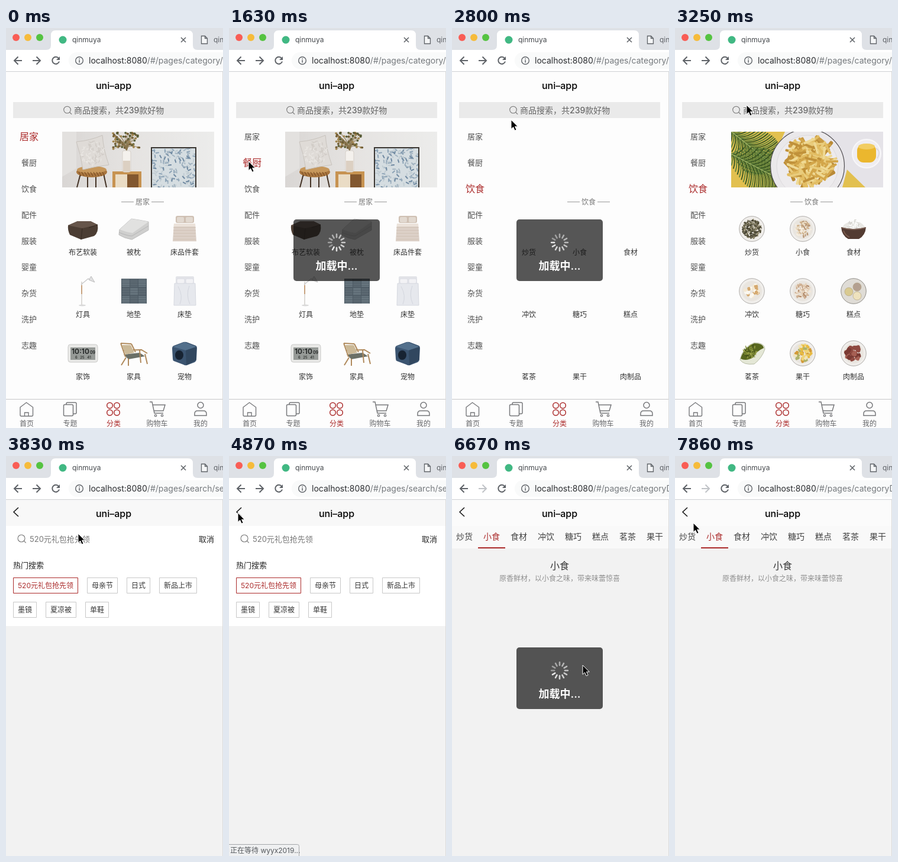
These frames come from a looping animation (367x675 px, 8 s). An HTML page with a canvas:

```html
<!DOCTYPE html>
<html lang="zh-CN">
<head>
<meta charset="utf-8">
<title>uni-app</title>
<style>
html, body { margin: 0; width: 100%; height: 100%; overflow: hidden; background: #fff; }
canvas { display: block; width: 367px; height: 675px; }
</style>
</head>
<body>
<canvas id="stage"></canvas>
<script>
const W = 367, H = 675, LOOP = 8000, TICK = 147.5;
const RED = '#ab2b2b', GREY = '#5f6368', PAGE = '#fdfdfd';
const FONT = 'Inter, "Noto Sans CJK SC", "Noto Sans CJK", sans-serif';
const cv = document.getElementById('stage');
const ratio = window.devicePixelRatio || 1;
cv.width = W * ratio;
cv.height = H * ratio;
const c = cv.getContext('2d');

const SIDE = ['居家', '餐厨', '饮食', '配件', '服装', '婴童', '杂货', '洗护', '志趣'];
const ITEMS = [
  ['布艺软装', '被枕', '床品件套', '灯具', '地垫', '床垫', '家饰', '家具', '宠物'],
  ['锅具', '餐具', '茶具', '刀具', '杯壶', '厨具', '酒具', '清洁', '收纳'],
  ['炒货', '小食', '食材', '冲饮', '糖巧', '糕点', '茗茶', '果干', '肉制品']
];

// --- helpers ---
function text(s, x, y, size, color, align = 'left', weight = 400) {
  c.font = `${weight} ${size}px ${FONT}`;
  c.textAlign = align;
  c.fillStyle = color;
  c.fillText(s, x, y + size * 0.37);
}
function rect(x, y, w, h, fill) {
  c.fillStyle = fill;
  c.fillRect(x, y, w, h);
}
function paint(fill, stroke, lw = 1) {
  if (fill) { c.fillStyle = fill; c.fill(); }
  if (stroke) { c.strokeStyle = stroke; c.lineWidth = lw; c.stroke(); }
}
function round(x, y, w, h, r, fill, stroke, lw) {
  c.beginPath();
  c.roundRect(x, y, w, h, r);
  paint(fill, stroke, lw);
}
function oval(x, y, rx, ry, fill, stroke, lw) {
  c.beginPath();
  c.ellipse(x, y, rx, ry, 0, 0, 7);
  paint(fill, stroke, lw);
}
const disc = (x, y, r, fill, stroke, lw) => oval(x, y, r, r, fill, stroke, lw);
function shape(d, fill, stroke, lw = 1, x = 0, y = 0) {
  const p = new Path2D(d);
  c.save();
  c.translate(x, y);
  if (fill) { c.fillStyle = fill; c.fill(p); }
  if (stroke) { c.strokeStyle = stroke; c.lineWidth = lw; c.stroke(p); }
  c.restore();
}
function random(seed) {
  return () => (seed = (seed * 16807) % 2147483647) / 2147483647;
}
// pieces scattered over a disc
function scatter(x, y, spread, n, colors, w, h, seed) {
  const rnd = random(seed * 7919 + 13);
  rnd();
  for (let i = 0; i < n; i++) {
    const a = rnd() * 6.283, r = Math.sqrt(rnd()) * spread;
    c.save();
    c.translate(x + Math.cos(a) * r, y + Math.sin(a) * r);
    c.rotate(rnd() * 3.14);
    round(-w / 2, -h / 2, w, h, Math.min(w, h) / 3, colors[i % colors.length]);
    c.restore();
  }
}

// --- browser frame ---
function chrome(path, canForward) {
  rect(0, 0, W, 37, '#dee1e6');
  ['#f95d55', '#f6bb3a', '#55c341'].forEach((col, i) => disc(17 + i * 20, 16, 6, col));
  shape('M68 37Q76 37 76 29V12Q76 4 84 4H308Q316 4 316 12V29Q316 37 324 37Z', '#fff');
  disc(96, 20, 6.5, '#41b883');
  text('qinmuya', 112, 20, 12, '#45494d');
  shape('M296 16l8 8m0-8l-8 8', null, GREY, 1.6);
  shape('M330.5 13.5h6l4 4v9h-10zM336.5 13.5v4h4', '#f5f6f7', GREY, 1.3);
  text('qinmuya', 351, 20, 12, GREY);
  rect(0, 37, W, 36, '#fff');
  shape('M27 55H14m6.5-6.5L14 55l6.5 6.5', null, GREY, 2);
  shape('M45 55H58m-6.5-6.5L58 55l-6.5 6.5', null, canForward ? GREY : '#c0c3c7', 2);
  shape('M89 51A6 6 0 1 0 90 56.5', null, GREY, 2);
  shape('M91 48v6h-6z', GREY);
  round(106, 41, 290, 28, 14, '#f9fafa');
  disc(124, 55, 6.3, null, GREY, 1.4);
  rect(123.3, 54, 1.5, 4.5, GREY);
  rect(123.3, 51.3, 1.5, 1.6, GREY);
  text('localhost:8080', 140, 55, 14, '#2b2d30');
  const w = c.measureText('localhost:8080').width;
  text('/#/pages/' + path, 140 + w, 55, 14, '#75797d');
  rect(0, 73, W, 1, '#cfd1d4');
  rect(366, 74, 1, 601, '#dcdcdc');
}
function navBar(bg, back) {
  rect(0, 74, W, 44, bg);
  text('uni–app', 182, 97, 16, '#000', 'center', 500);
  if (back) shape('M21 87L13 94.5L21 102', null, '#111', 1.5);
}
function lens(x, y, r) {
  disc(x, y, r, null, '#777', 1.1);
  shape(`M${x + r * .7} ${y + r * .7}l3.5 3.5`, null, '#777', 1.2);
}

// --- banners ---
function homeBanner() {
  const wall = c.createLinearGradient(95, 0, 352, 0);
  wall.addColorStop(0, '#d9d6d4');
  wall.addColorStop(.45, '#e5e3e1');
  wall.addColorStop(1, '#ececeb');
  rect(95, 175, 257, 94, wall);
  shape('M95 175h24v62l-24 14z', '#e3e1df');
  shape('M126 246L120 269M165 246L170 269M138 248v21M152 248v21', null, '#433225', 2);
  oval(145, 243, 26, 9, '#a9763f');
  oval(145, 239, 25, 6, '#c6975b');
  for (let x = 123; x < 168; x += 5) shape(`M${x} 243l4 7`, null, '#70451f', 1);
  shape('M119 192Q142 190 163 181Q165 207 174 231Q154 233 130 239Q127 215 119 192Z', '#dfdbd7', '#c8c3bd');
  scatter(146, 211, 20, 70, ['#e9e6e2', '#d1ccc7'], 1.5, 5, 6);
  rect(180, 242, 49, 27, '#c79351');
  rect(185, 247, 39, 22, '#82572f');
  rect(185, 247, 20, 22, '#eadcc5');
  const rnd = random(4211);
  for (let i = 0; i < 70; i++) {
    const x = 180 + rnd() * 46, y = 176 + rnd() * 28;
    shape(`M204 209Q204 194 ${x} ${y}`, null, '#88754d', .5);
    oval(x, y, 2, 1.8, ['#6f5b34', '#a18650', '#565b35'][i % 3]);
  }
  round(197, 207, 14, 36, 3, '#f4f1ed', '#d6d0c9');
  rect(198, 224, 12, 18, '#dcd0c2');
  rect(245, 201, 77, 68, '#3a3632');
  rect(247, 203, 73, 66, '#d5dde1');
  c.save();
  c.beginPath();
  c.rect(247, 203, 73, 66);
  c.clip();
  scatter(284, 237, 48, 230, ['#8ea4b7', '#a3b4c1', '#6f89a1', '#c2cdd3'], 2, 6, 9);
  c.restore();
}
function foodBanner() {
  rect(95, 175, 257, 94, '#e5e3e8');
  shape('M95 175H186L168 215L180 269H95ZM283 269L291 239L322 269Z', '#e2c04f');
  for (let k = 0; k < 2; k++) {
    c.save();
    c.translate(92 + k * 2, 172 + k * 40);
    c.rotate(.68 - k * .2);
    for (let i = 0; i < 26; i++) {
      const x = i * 3.6, len = 34 * Math.sin((i + 4) / 31 * 3.14) + 4;
      shape(`M${x} 0q${len * .5} ${-len * .3} ${len * .6} ${-len}M${x} 0q${len * .5} ${len * .3} ${len * .6} ${len}`,
        null, i % 2 ? '#3c5b26' : '#67853d', 2);
    }
    shape('M0 0H92', null, '#9db267', 1.3);
    c.restore();
  }
  disc(224, 233, 62.5, '#eae8ea', '#4f4c4f', 1.2);
  disc(224, 233, 52, '#edebed', '#dddadd');
  scatter(228, 225, 41, 40, ['#b98a37', '#c99b44'], 6, 20, 4);
  scatter(228, 225, 38, 190, ['#d3a64a', '#e9cc7c', '#efd994', '#c0913a', '#e2bd63'], 4, 21, 21);
  disc(324, 212, 24, '#efedf1', '#f8f7f9', 2);
  round(308, 196, 32, 31, 11, '#ebb72e');
  oval(324, 200, 14, 5, '#f2cd62');
  shape('M340 203q9 5 2 17', null, '#d9d6dc', 1.5);
}

// --- product pictures, drawn around 0,0 ---
const homeArt = [
  () => {
    shape('M-25-6L-9-13H13L25-7Q27 6 19 12L-3 18L-22 10Q-26 2-25-6Z', '#4b3d33');
    shape('M-25-6L-9-13H13L25-7L-1-1Z', '#66554a');
    shape('M-1-1L-3 18M25-7L10-2', null, '#362a22');
  },
  () => {
    shape('M-24 1L-4-17Q10-15 25-12V2L-3 18Q-16 16-25 10Z', '#cfcfce', '#bdbdbd');
    shape('M-24 1L-4-17Q10-15 25-12L-2 7Q-14 5-24 1Z', '#e1e1e0');
    shape('M-25 6Q-10 12-3 12L25-5', null, '#b5b5b6');
  },
  () => {
    round(-15, -22, 31, 12, 3, '#cfc0b3');
    round(-13, -20, 12, 9, 2, '#e2d9d0');
    round(2, -20, 12, 9, 2, '#e2d9d0');
    shape('M-18-9H18L20 21H-20Z', '#dcd0c7');
    for (let y = -3; y < 20; y += 5) rect(-19, y, 38, .7, '#cdbdb1');
    rect(-18, -9, 36, 5, '#ebe2da');
  },
  () => {
    shape('M-2-16V23', null, '#cfcac6', 1.4);
    shape('M-2-10V5', null, '#c9a37f', 2);
    shape('M-3-11L9-21L17-17', null, '#c5c5c6', 1.1);
    shape('M10-19L14-25L20-15Z', '#e0e0e1', '#bebebe');
    oval(-1, 24, 6, 1.5, '#d9d9d9');
  },
  () => {
    rect(-21, -21, 43, 42, '#4c5963');
    for (let i = 0; i < 9; i++) rect(-20 + i % 3 * 14, -20 + Math.floor(i / 3) * 14, 13, 13, i % 2 ? '#5b6871' : '#66747d');
    for (let y = -18; y < 21; y += 4) rect(-21, y, 43, .6, '#4e5b65');
  },
  () => {
    round(-15, -25, 31, 14, 2, '#e2e3e8');
    shape('M-17-13H18L19 24H-18Z', '#e6e8ed', '#d6d9e0');
    round(-13, -21, 13, 8, 2, '#f2f2f5', '#dadce3');
    round(2, -21, 13, 8, 2, '#f2f2f5', '#dadce3');
    shape('M-11-8Q-2 8-8 22M8-9Q2 7 9 22', null, '#d3d6de');
  },
  () => {
    round(-25, -15, 50, 30, 4, '#e9e9e7', '#cbcbca');
    rect(-21, -10, 42, 21, '#969a97');
    text('10:10', -19, -3, 12, '#1c1f1f', 'left', 600);
    text('09', 12, -2, 7, '#1c1f1f', 'left', 600);
    text('6   25   41', -13, 7, 6, '#303431', 'left', 600);
  },
  () => {
    shape('M-17 2L10-1L19 5L-9 10Z', '#6b7067');
    shape('M-22-17L-14 6M-22-17L-4-16M-4-16L3-2M-17-5L13-6L23 0M-13 7L-21 20M-9 9V21M19 1L23 18M10-5L12 16', null, '#b08a5c', 2);
    shape('M-20-14L-5-14L1-1L-14 2Z', '#cbb997');
  },
  () => {
    shape('M-18-13L-2-19Q2-20 6-18L19-13Q21-12 21-9L20 10Q20 13 17 15L4 20Q1 21-2 19L-18 13Q-20 12-20 9L-21-8Q-21-12-18-13Z', '#3b5470');
    shape('M-20-11L0-19L20-11L2-5Z', '#53708c');
    shape('M2-5L20-11V11L3 20Z', '#31475f');
    oval(-9, 3, 7, 8, '#172332');
  }
];
function plate(colors, n, spread, w, h, seed) {
  disc(0, 0, 21.3, '#f0eeeb', '#a7a4a1', .9);
  disc(0, 0, 17, '#e9e5df');
  scatter(0, 0, spread, n, colors, w, h, seed);
}
const foodArt = [
  () => plate(['#3f3d2c', '#6e6a50', '#514c38', '#948c70'], 210, 15.5, 1.7, 4, 3),
  () => plate(['#cfb18b', '#eadbc3', '#f5ede0', '#b99877'], 70, 13, 2.5, 5, 5),
  () => {
    shape('M-19-1Q-17-9-9-11Q0-17 8-12Q17-9 20-1Z', '#e9e8e4');
    scatter(0, -6, 10, 50, ['#fff', '#d6d5d0'], 1.6, 3.5, 8);
    shape('M-21-3Q0 3 21-3Q20 11 9 17H-9Q-20 11-21-3Z', '#533b32');
    shape('M-17 3Q-14 11-7 14', null, '#79594b', 2);
    shape('M-20-2Q0 4 20-2', null, '#82665a', 1.5);
  },
  () => plate(['#fbf8f0', '#f4e8d2', '#d5a96f'], 24, 13, 5, 6, 11),
  () => plate(['#cfb092', '#f3e8d9', '#e5d1b9', '#b58f70'], 75, 13, 2.5, 5, 17),
  () => {
    disc(0, 0, 21.3, '#dfdcd6', '#918e89');
    [[-8, 1, '#d9ca91'], [6, -7, '#b4a090'], [6, 8, '#eee2bd']].forEach(([x, y, col]) => disc(x, y, 7, col, '#ad9c79', .6));
  },
  () => {
    shape('M-20 11Q-16-10 4-18Q22-18 22-7Q17 8 4 18Q-14 20-20 11Z', '#e4e7d6', '#b9bea7');
    shape('M-19 9Q-14-9 4-17Q19-17 20-9Q8-4 2 7Q-10 14-19 9Z', '#58671f');
    scatter(-3, -3, 11, 90, ['#7e8b35', '#46531b', '#9aa24a'], 1.3, 5, 23);
  },
  () => plate(['#e7bb42', '#d39a38', '#f0d479', '#aeb26a', '#efe3bc'], 46, 14, 4.5, 7, 29),
  () => plate(['#8f4a41', '#a65f53', '#7a3a33'], 24, 12, 7.5, 8, 31)
];

// --- pages ---
function tabBar() {
  rect(0, 626, W, 49, PAGE);
  rect(0, 626, W, 1, '#c6c6c8');
  const g = '#77787b';
  shape('M24 640L34.5 632L45.5 640V653Q45.5 655 43.5 655H26Q24 655 24 653ZM31.5 655V649H38V655', null, g, 1.4);
  round(97.5, 635.5, 16, 19, 2, null, g, 1.5);
  shape('M102 635V634Q102 632 104 632H117Q119 632 119 634V649Q119 651 117 651H114', null, g, 1.5);
  for (let i = 0; i < 4; i++) disc(175.5 + i % 2 * 12, 637 + (i >> 1) * 12, 4.8, null, RED, 1.5);
  shape('M243 631H247L251 650H266M248 636H269L266 646H250', null, g, 1.5);
  disc(253, 654, 1.7, null, g, 1.3);
  disc(264, 654, 1.7, null, g, 1.3);
  disc(329, 636.5, 5, null, g, 1.5);
  shape('M319 654V651Q319 646 324 646H334Q339 646 339 651V654Z', null, g, 1.5);
  ['首页', '专题', '分类', '购物车', '我的'].forEach((s, i) =>
    text(s, 35 + i * 73.5, 668, 12, i === 2 ? RED : '#66676a', 'center', 500));
}
function categoryPage(active, shown, loaded) {
  rect(0, 74, W, 601, PAGE);
  navBar(PAGE);
  rect(12, 125, 340, 27, '#eaeaea');
  lens(103.5, 138, 5.8);
  text('商品搜索，共239款好物', 115, 138.5, 14, '#666', 'left', 500);
  SIDE.forEach((s, i) => {
    const on = i === active;
    text(s, 39, 183 + i * 44, on ? 16 : 13, on ? RED : '#505050', 'center');
  });
  if (loaded) {
    c.save();
    c.beginPath();
    c.rect(95, 175, 257, 94);
    c.clip();
    shown ? foodBanner() : homeBanner();
    c.restore();
  }
  rect(195, 293, 21, 1, '#999');
  rect(246, 293, 21, 1, '#999');
  text(SIDE[shown], 231, 293.5, 12, '#777', 'center');
  const art = shown ? foodArt : homeArt;
  ITEMS[shown].forEach((s, i) => {
    const x = 130 + i % 3 * 86, y = 339 + Math.floor(i / 3) * 105;
    if (loaded) {
      c.save();
      c.translate(x, y);
      art[i]();
      c.restore();
    }
    text(s, x, y + 40, 12, '#333', 'center');
  });
  tabBar();
}
function chips(list, y, firstRed) {
  let x = 12;
  list.forEach((s, i) => {
    const red = firstRed && i === 0;
    c.font = `400 12px ${FONT}`;
    const w = Math.round(c.measureText(s).width) + 16;
    round(x + .5, y + .5, w - 1, 26, 0, null, red ? RED : '#c8c8c8', 1);
    text(s, x + 8, y + 13.5, 12, red ? RED : '#333');
    x += w + 15;
  });
}
function searchPage(waiting) {
  rect(0, 74, W, 601, '#f2f2f2');
  rect(0, 118, W, 169, '#fff');
  navBar('#f8f8f8', true);
  lens(26, 139, 6);
  text('520元礼包抢先领', 40, 140.5, 13, '#777');
  text('取消', 326, 140.5, 13, '#222');
  text('热门搜索', 12, 184.5, 13, '#222');
  chips(['520元礼包抢先领', '母亲节', '日式', '新品上市'], 205, true);
  chips(['墨镜', '夏凉被', '单鞋'], 246);
  if (waiting) {
    round(-4, 655.5, 122.5, 24, 3, '#eff0f1', '#a4a6a9');
    text('正在等待 wyyx2019...', 2, 666, 12, '#55595d');
  }
}
function detailPage(ready) {
  rect(0, 74, W, 601, '#f2f2f2');
  navBar('#fbfbfb', true);
  if (!ready) return;
  rect(0, 118, W, 38, '#f9f9f9');
  ITEMS[2].forEach((s, i) => text(s, 7 + i * 46, 135.5, 14, i === 1 ? RED : '#444'));
  rect(44, 154, 46, 2, RED);
  text('小食', 182, 185.5, 16, '#333', 'center');
  text('原香鲜材，以小食之味，带来味蕾惊喜', 182, 207, 12, '#8f8f8f', 'center', 500);
}
function toast(t) {
  round(109, 323, 146, 104, 5, 'rgba(17,17,17,.7)');
  const turn = Math.floor(t / 1000 * 12);
  for (let i = 0; i < 12; i++) {
    const v = i ? 145 + i * 7 : 233;
    c.save();
    c.translate(182, 362);
    c.rotate((i + turn) * Math.PI / 6);
    round(-1.3, -15.2, 2.6, 7.6, 1.3, `rgb(${v},${v},${v})`);
    c.restore();
  }
  text('加载中...', 182, 401, 18, '#fff', 'center', 600);
}

// --- pointer ---
const PATH = [
  [300, 182, 662], [1040, 33, 232], [1330, 33, 225], [1780, 33, 225], [2070, 33, 268], [2520, 34, 268],
  [2807, 100, 155], [3250, 121, 130], [3690, 122, 131], [4280, 335, 140], [4430, 335, 140],
  [4872, 15, 96], [5020, 15, 96], [5315, 217, 368], [5470, 217, 368], [5757, 219, 342],
  [6200, 219, 342], [6500, 221, 353], [7380, 221, 353], [7822, 31, 113], [8100, 31, 113]
];
function pointer(t) {
  if (t < 300) return;
  const s = 300 + Math.floor((t - 292) / TICK) * TICK;
  const i = Math.max(1, PATH.findIndex(p => p[0] >= s));
  const [t0, x0, y0] = PATH[i - 1], [t1, x1, y1] = PATH[i];
  const k = (s - t0) / (t1 - t0), e = k * k * (3 - 2 * k);
  shape('M0 0V15.5L3.6 12.2L6.2 18L9 16.8L6.5 11.2H11.3Z', '#000', '#fff', 1,
    x0 + (x1 - x0) * e, y0 + (y1 - y0) * e);
}

const within = (t, a, b) => t >= a && t < b;
function draw(t) {
  c.setTransform(ratio, 0, 0, ratio, 0, 0);
  rect(0, 0, W, H, '#fff');
  let path = 'category/category';
  if (within(t, 3540, 5170)) {
    path = 'search/search';
    searchPage(t >= 4870);
  } else if (t >= 6370) {
    path = 'categoryDetail/categoryDetail';
    detailPage(t >= 6670);
  } else {
    const active = t < 1180 ? 0 : t < 2220 ? 1 : 2;
    const shown = t < 1780 ? 0 : t < 2660 ? 1 : 2;
    categoryPage(active, shown, shown === 0 || t >= 3100);
  }
  chrome(path, t < 6370);
  if (within(t, 1330, 2080) || within(t, 2360, 2950) || within(t, 6370, 7120)) toast(t);
  pointer(t);
}

const start = performance.now();
function loop() {
  draw((performance.now() - start) % LOOP);
  requestAnimationFrame(loop);
}
loop();
</script>
</body>
</html>
```
